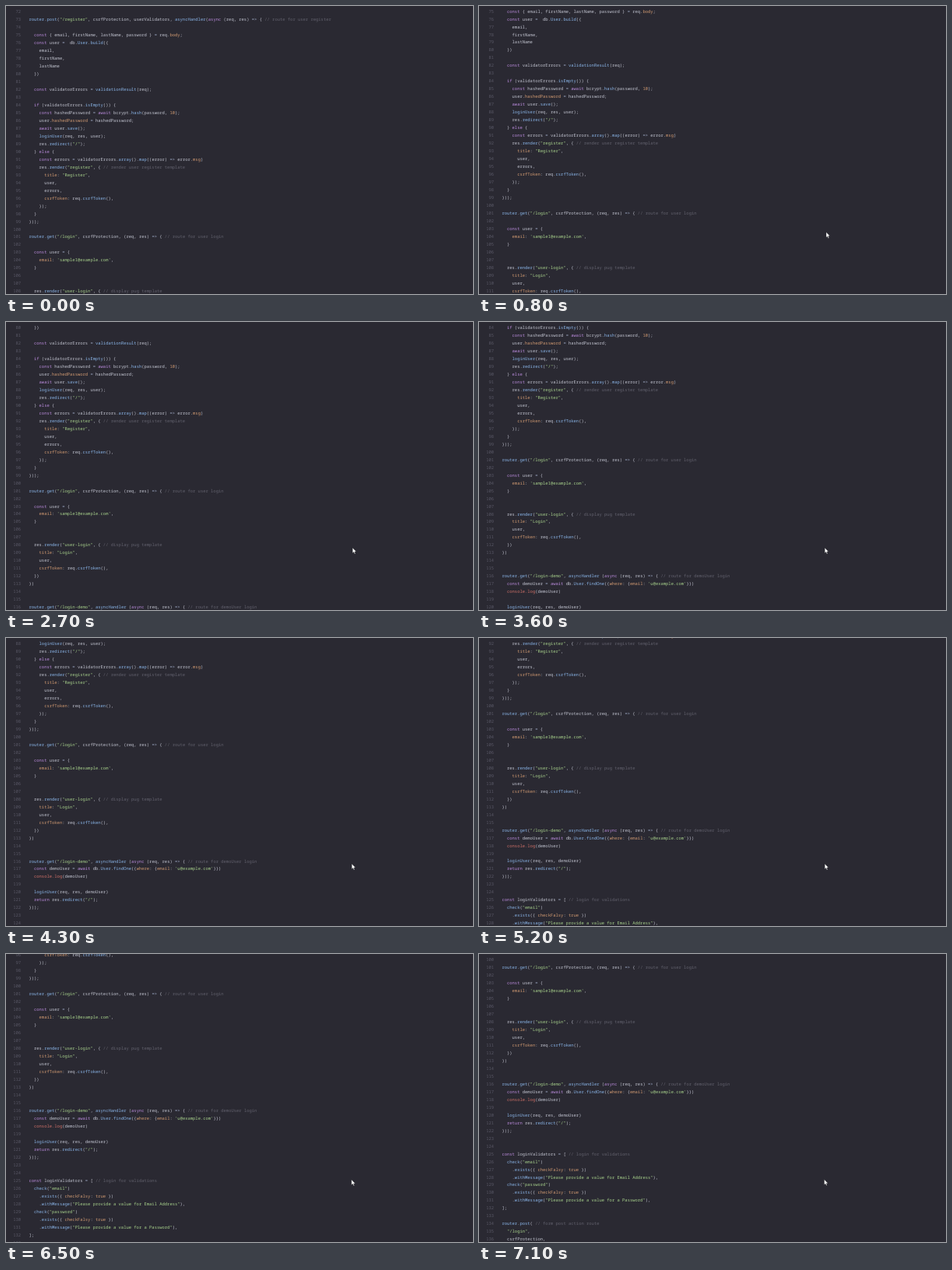
An HTML page for the animation above (7200 ms loop, 600 by 370 pixels).

```html
<!DOCTYPE html>
<html lang="en">
<head>
<meta charset="utf-8">
<title>Scrolling code</title>
<style>
  html, body { margin: 0; width: 100%; height: 100%; overflow: hidden; background: #2a2932; }
  svg { display: block; width: 600px; height: 370px; }
  text {
    font: 5.493px "Noto Sans Mono", "DejaVu Sans Mono", monospace;
    font-variant-ligatures: none;
    text-rendering: geometricPrecision;
    white-space: pre;
    fill: #c2c4d0;
  }
  .number { fill: #595866; text-anchor: end; }
  .comment { fill: #62616d; }
  .string { fill: #a8d28c; }
  .keyword { fill: #ba8bdc; }
  .call { fill: #8ab5e8; }
  .property { fill: #d19a72; }
  .console { fill: #cf7068; }
  .operator { fill: #a9b4d2; }
</style>
</head>
<body>
<svg viewBox="0 0 600 370">
  <rect width="600" height="370" fill="#2a2932"/>
  <g id="code"></g>
  <path id="cursor" d="M0 0V7L1.6 5.6L2.7 8L3.8 7.5L2.8 5.2H4.9Z" fill="#fff" stroke="#17171c" stroke-width=".4"/>
</svg>
<script>
const LOOP = 7200;
const FIRST_LINE = 72;
const LINE_HEIGHT = 9.986;
const LINES_PER_SCROLL = 4;
const CODE_LEFT = 29.4;

const source = `
router.post("/register", csrfProtection, userValidators, asyncHandler(async (req, res) => { // route for user register

  const { email, firstName, lastName, password } = req.body;
  const user =  db.User.build({
    email,
    firstName,
    lastName
  })

  const validatorErrors = validationResult(req);

  if (validatorErrors.isEmpty()) {
    const hashedPassword = await bcrypt.hash(password, 10);
    user.hashedPassword = hashedPassword;
    await user.save();
    loginUser(req, res, user);
    res.redirect("/");
  } else {
    const errors = validatorErrors.array().map((error) => error.msg)
    res.render("register", { // render user register template
      title: "Register",
      user,
      errors,
      csrfToken: req.csrfToken(),
    });
  }
}));

router.get("/login", csrfProtection, (req, res) => { // route for user login

  const user = {
    email: 'sample1@example.com',
  }


  res.render("user-login", { // display pug template
    title: "Login",
    user,
    csrfToken: req.csrfToken(),
  })
})


router.get("/login-demo", asyncHandler (async (req, res) => { // route for demoUser login
  const demoUser = await db.User.findOne({where: {email: 'u@example.com'}})
  console.log(demoUser)

  loginUser(req, res, demoUser)
  return res.redirect("/");
}));


const loginValidators = [ // login for validations
  check("email")
    .exists({ checkFalsy: true })
    .withMessage("Please provide a value for Email Address"),
  check("password")
    .exists({ checkFalsy: true })
    .withMessage("Please provide a value for a Password"),
];

router.post( // form post action route
  "/login",
  csrfProtection,`;

const tokenPattern = new RegExp([
  /(?<comment>\/\/.*)/,
  /(?<string>"[^"]*"|'[^']*')/,
  /(?<console>console\.log)/,
  /(?<keyword>\b(?:const|await|async|if|else|return)\b)/,
  /(?<call>\brouter\b|\bUser\b|\b[A-Za-z]\w*(?= ?\())/,
  /(?<property>\b\w+(?=:)|(?<=\.)\w+|\btrue\b|\b\d+\b)/,
  /(?<operator>=>|=)/,
].map(part => part.source).join("|"), "g");

const codeGroup = document.getElementById("code");
const cursor = document.getElementById("cursor");

function addElement(parent, tag, attributes, content = "") {
  const element = document.createElementNS("http://www.w3.org/2000/svg", tag);
  for (const [name, value] of Object.entries(attributes)) element.setAttribute(name, value);
  element.textContent = content;
  return parent.appendChild(element);
}

function addLine(line, index) {
  const y = 8.9 + index * LINE_HEIGHT;
  addElement(codeGroup, "text", { x: 19, y, class: "number" }, FIRST_LINE + index);
  const text = addElement(codeGroup, "text", { x: CODE_LEFT, y });
  let end = 0;
  for (const match of line.matchAll(tokenPattern)) {
    const kind = Object.keys(match.groups).find(name => match.groups[name]);
    text.append(line.slice(end, match.index));
    addElement(text, "tspan", { class: kind }, match[0]);
    end = match.index + match[0].length;
  }
  text.append(line.slice(end));
}

source.split("\n").forEach(addLine);

// Start and end of each wheel scroll, in ms
const scrolls = [
  [540, 940], [1680, 2090], [2690, 3090], [3590, 4050],
  [4540, 4900], [5510, 5820], [6390, 6800],
];

// Pointer positions: time, x, y
const pointerPath = [
  [100, 586, 362], [600, 446, 290.4], [1700, 446, 290.4], [2100, 445.2, 289.9],
  [3200, 445.2, 289.9], [3300, 444.2, 289.9], [6400, 444.2, 289.9], [6600, 443.5, 289.6],
];

const progress = (t, start, end) => Math.min(1, Math.max(0, (t - start) / (end - start)));
const easeInOut = u => u < 0.5 ? 2 * u * u : 1 - 2 * (1 - u) ** 2;

function pointerAt(t) {
  let [, x, y] = pointerPath[0];
  for (let i = 1; i < pointerPath.length; i++) {
    const [start, fromX, fromY] = pointerPath[i - 1];
    const [end, toX, toY] = pointerPath[i];
    const u = easeInOut(progress(t, start, end));
    x += (toX - fromX) * u;
    y += (toY - fromY) * u;
  }
  return [x, y];
}

function render(t) {
  const scrolled = scrolls.reduce((sum, [start, end]) => sum + easeInOut(progress(t, start, end)), 0);
  const offset = -scrolled * LINES_PER_SCROLL * LINE_HEIGHT;
  codeGroup.setAttribute("transform", `translate(0 ${offset.toFixed(3)})`);
  cursor.setAttribute("visibility", t < pointerPath[0][0] ? "hidden" : "visible");
  cursor.setAttribute("transform", `translate(${pointerAt(t).join(" ")})`);
}

const startTime = performance.now();
function tick() {
  render((performance.now() - startTime) % LOOP);
  requestAnimationFrame(tick);
}
tick();
</script>
</body>
</html>
```
